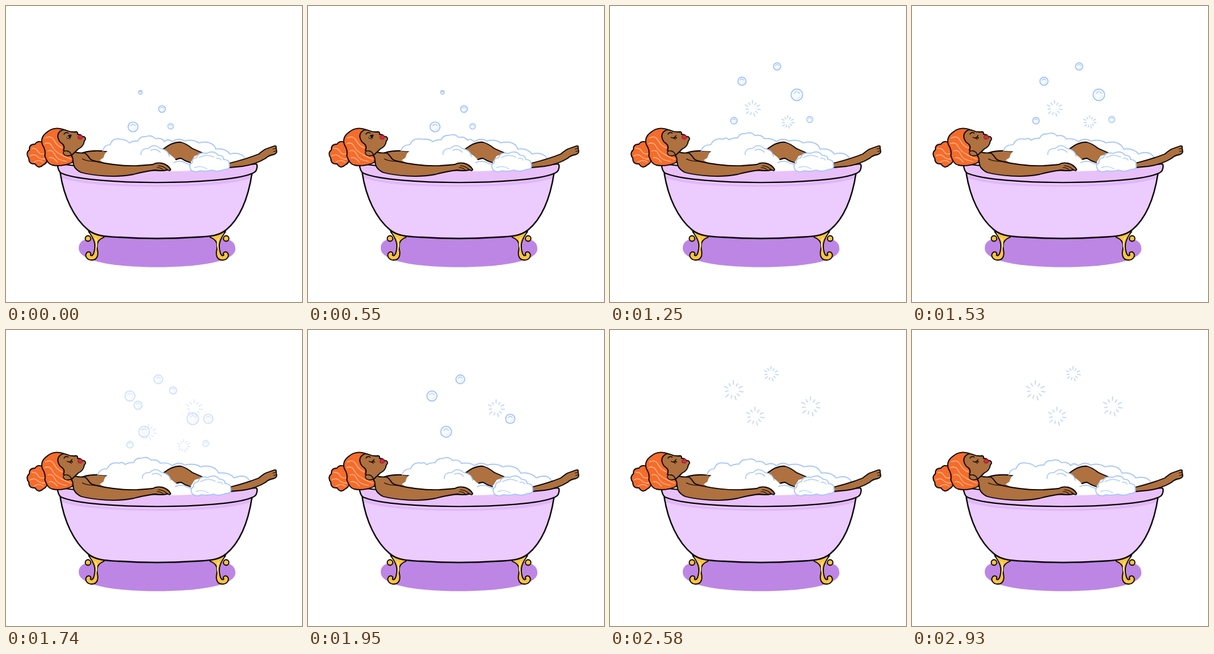
An HTML page for the animation above (3130 ms loop, 480 by 480 pixels).

```html
<!DOCTYPE html>
<html lang="en">
<head>
<meta charset="utf-8">
<title>Bubble bath</title>
<style>
html, body { margin: 0; width: 100%; height: 100%; overflow: hidden; background: #fff; }
svg { display: block; width: 100%; height: 100%; }
.ink { stroke: #0b0708; stroke-width: 1.8; }
.skin { fill: #ae713f; }
.line { fill: none; }
.foam { fill: #fff; stroke: #a5c5fa; stroke-width: 1.7; }
.shade { fill: none; stroke: #b5d0fb; stroke-width: 1.4; }
.white { fill: #fff; }
.lock { fill: none; stroke: #ffad80; stroke-width: 1.6; }
</style>
</head>
<body>
<svg viewBox="0 0 480 480" stroke-linecap="round" stroke-linejoin="round">
  <path fill="#bd86e5" d="M118 393C118 371 150 374 245 374S372 371 372 394C372 415 310 423.500 245 423.500S118 415 118 393Z"/>

  <g id="tub">
    <g id="leg" class="ink" fill="#fcc340">
      <circle cx="133" cy="377" r="4.500"/>
      <path d="M134 366C143 378 146 386 143 398C142 404 139 406 137 404C139 400 135 397 131 400C127 405 131 412 139 412C149 412 150 403 148 394C147 384 149 379 159 375L156 367Z"/>
      <path class="line" stroke="#fff0a8" style="stroke:#ffe795" d="M145 376Q149 383 146 394"/>
    </g>
    <use href="#leg" transform="matrix(-1 0 0 1 490 0)"/>
    <path id="bowl" fill="#eccbff" d="M88 271C94 310 110 344 133 363C146 374 165 374 185 375Q245 379 305 375C330 374 345 373 357 363C380 344 393 310 399 271Z"/>
    <path fill="#e0b7f8" d="M90 273C140 296 350 296 398 272L397 279C350 298 140 298 91 279Z"/>
    <path class="ink line" style="stroke-width:2.300" d="M88 271C94 310 110 344 133 363C146 374 165 374 185 375Q245 379 305 375C330 374 345 373 357 363C380 344 393 310 399 271"/>
    <path class="ink" style="stroke-width:2.200" fill="#e9c1fa" d="M86 256Q245 277 405 256Q409 257 406 266Q404 270 398 272C350 291 140 291 92 272Q86 271 84 261Q83 257 86 256Z"/>
  </g>

  <path class="ink skin" d="M124 238Q145 232 169 237L169 262L122 262Z"/>
  <path id="backFoam" class="foam"/>
  <path class="white" d="M158 246Q160 236 170 232H300L362 246V262Q300 268 262 268L175 260Q160 256 152 250Z"/>
  <path class="ink skin" d="M362 255Q390 248 410 240Q417 234 421 232L435 227Q439 226 438 230L439 236Q439 239 434 241Q426 242 421 247Q405 257 383 260L362 262"/>
  <path class="ink line" style="stroke-width:1" d="M433 232L437 231M434 236L438 235"/>
  <path class="skin" d="M253 234Q272 219 284 221Q292 223 302 231L320 239L306 243L299 254Q292 253 284 247L276 250Q268 240 253 234Z"/>
  <path class="ink line" d="M255 232Q272 219 284 221Q292 223 302 231L318 238M272 251Q278 247 284 247Q291 252 299 254"/>
  <g id="frontFoam">
    <path class="white" d="M218 242Q218 231 231 231Q240 222 250 231Q263 234 264 243L276 250L272 262H210Z"/>
    <path class="shade" style="stroke:#a5c5fa" d="M219 241Q218 231 231 231Q240 222 250 231Q263 233 265 244M235 234Q243 230 250 237M272 254Q283 249 292 255L299 257"/>
    <path class="foam" d="M300 266Q295 258 302 254Q301 247 309 246Q312 236 325 239Q337 233 344 242Q353 242 353 249Q363 249 362 258Q364 265 354 265Q344 270 334 266Q324 269 315 267Q306 271 300 266Z"/>
    <path class="shade" d="M313 246Q325 239 337 245M341 247Q347 246 349 250M306 262Q316 258 326 264"/>
  </g>

  <path class="ink skin" d="M104 232Q113 240 127 238C137 243 131 249 146 252Q180 260 213 259Q228 258 238 257Q244 253 253 255Q262 257 267 265Q267 268 262 266Q251 268 242 266Q221 269 207 273C178 279 141 275 122 270Q109 264 109 253Z"/>
  <path class="ink line" style="stroke-width:1.200" d="M124 248Q131 252 146 252M247 259Q255 259 262 266M245 262Q252 262 256 267"/>

  <g id="head">
    <path class="ink" fill="#f56c2b" d="M61 222Q52 217 47 224Q37 224 38 233Q31 239 37 247Q37 257 47 256Q53 265 60 258Q68 254 67 246Z"/>
    <path class="lock" d="M42 231Q49 230 52 236T64 239M39 243Q46 239 51 244T64 248M46 253Q53 248 60 253"/>
    <path class="ink skin" d="M84 203Q91 199 99 202Q106 205 113 204Q117 204 116 208L121 209L123 211L127 212Q131 215 127 219Q126 228 117 232Q111 238 104 244L84 234Z"/>
    <path class="ink" fill="#f56c2b" d="M93 200Q77 195 66 205Q55 213 59 225Q65 234 63 243Q67 256 75 258Q91 261 107 254Q111 247 105 242L93 234Q97 226 88 221Q80 210 88 203Z"/>
    <path class="lock" d="M64 214Q73 209 78 218T91 230M63 223Q71 220 75 228T91 242T105 248M68 235Q75 232 79 241T98 252M70 246Q76 244 83 253"/>
    <path class="ink skin" style="stroke-width:1.400" d="M105 242Q96 245 93 239Q92 234 99 235Q104 236 106 241"/>
    <path class="ink line" style="stroke-width:1.400" d="M94 208Q96 204 101 206"/>
    <path fill="#d82743" stroke="#70131d" stroke-width=".7" d="M121 209Q115 210 117 215Q122 218 125 213Z"/>
    <g id="eyeOpen">
      <path fill="#fff" class="ink" style="stroke-width:1" d="M99 214Q100 208 106 209L104 215Z"/>
      <path fill="#21120e" d="M101 209H106L104 214H101Z"/>
    </g>
    <path id="eyeShut" class="ink line" style="stroke-width:1.400" d="M99 213Q104 216 107 210M103 214L106 216M106 213L108 214"/>
  </g>
  <g id="bubbles"></g>
</svg>
<script>
const LOOP = 3130, STEP = 70, HOLD = 270, LAST = 2930, FADE = 210;
const byId = id => document.getElementById(id);
const clamp = v => Math.max(0, Math.min(1, v));

// Each stage: [start, bubbles as [x, y, radius], bursts as [x, y, radius]]
const stages = [
  [-FADE, [[218, 140, 3], [253, 167, 5.5], [267, 195, 4.6], [206, 196, 8]], []],
  [620, [[277, 113, 3.6], [219, 138, 4.4], [305, 157, 6.3], [231, 176, 8.5], [191, 198, 4], [286, 199, 7.8], [329, 177, 3.8]], []],
  [1040, [[271, 98, 5.8], [214, 122, 6.6], [303, 144, 9.4], [201, 186, 5.3], [324, 184, 5]], [[231, 166, 13], [288, 188, 10.5]]],
  [1635, [[247, 80, 7.1], [201, 107, 8.2], [328, 144, 7.5], [224, 165, 8.8]], [[305, 127, 14]]],
  [2300, [], [[200, 98, 16], [261, 71, 12], [325, 124, 16], [235, 140, 15]]]
];

function bubble([x, y, r]) {
  const a = r * .58;
  return `<g transform="translate(${x} ${y})" fill="none" stroke="#a0c3fa">
    <circle r="${r}" fill="#f7fbff" stroke-width="${r > 5 ? 1.7 : 1.3}"/>
    <path d="M${-a * .8} ${-a * .4}Q0 ${-a * 1.5} ${a * .8} ${-a * .4}" stroke-width="1.1"/>
    <path d="M${a} ${a * .2}Q${a * .8} ${a} ${a * .1} ${a}" stroke="#d4e5ff"/></g>`;
}

function burst([x, y, r]) {
  let d = "";
  for (let i = 0; i < 11; i++) {
    const a = i * Math.PI * 2 / 11 + .15, inner = r * (i % 2 ? .52 : .62), outer = r * (i % 2 ? .82 : 1);
    d += `M${x + inner * Math.cos(a)} ${y + inner * Math.sin(a)}L${x + outer * Math.cos(a)} ${y + outer * Math.sin(a)}`;
  }
  return `<path d="${d}" stroke="#bdd3fb" stroke-width="1.5"/>`;
}

byId("bubbles").innerHTML = stages.map(([, dots, pops]) =>
  `<g>${dots.map(bubble).join("")}${pops.map(burst).join("")}</g>`).join("");
const layers = [...byId("bubbles").children];

// Foam drift: [time, left, crest x, crest y, right]
const drift = [
  [0, 8, 4, 4, 0], [550, 2, 6, 2, 0], [970, 0, 0, 0, 0], [1250, -1, -3, -1, 1],
  [1740, 0, -3, 0, 9], [2230, 9, -5, 1, 9], [LAST, 8, 4, 4, 0]
];

function driftAt(t) {
  const i = Math.max(1, drift.findIndex(k => k[0] >= t));
  const a = drift[i - 1], b = drift[i], k = (t - a[0]) / (b[0] - a[0]);
  return a.map((v, j) => v + (b[j] - v) * k).slice(1);
}

function foamPath([l, x, y, r]) {
  return `M${149 + l} 235Q${151 + l} 225 ${164 + l * .6} 225Q${169 + l * .4} 213 ${184 + l * .3} 216
    Q${192 + x} ${213 + y} ${196 + x} ${218 + y}Q${203 + x} ${214 + y} ${210 + x} ${215 + y}
    Q${213 + x} ${207 + y} ${222 + x} ${208 + y}Q${232 + x} ${204 + y} ${238 + x} ${211 + y}
    Q${249 + x} ${209 + y} ${253 + x} ${216 + y}Q262 214 270 220Q280 213 290 219
    Q${303 + r * .3} 215 ${313 + r * .3} 222Q${328 + r * .3} 218 ${337 + r * .4} 226
    Q${340 + r * .5} 230 ${340 + r * .5} 232Q${356 + r * .6} 230 ${363 + r * .8} 240
    Q${380 + r} ${236 - r * .5} ${387 + r} 246`;
}

function draw(t) {
  const shown = stages.map(([start]) => clamp((t - start) / FADE));
  layers.forEach((g, i) => g.setAttribute("opacity", shown[i] * (1 - (shown[i + 1] || 0))));
  byId("eyeOpen").setAttribute("opacity", 1 - shown[1]);
  byId("eyeShut").setAttribute("opacity", shown[1]);
  const d = driftAt(t);
  byId("backFoam").setAttribute("d", foamPath(d));
  byId("frontFoam").setAttribute("transform", `translate(${d[3] * .25} 0)`);
}

function tick() {
  const t = performance.now() % LOOP;
  draw(t < HOLD ? 0 : Math.min(LAST, HOLD + STEP * Math.floor((t - HOLD) / STEP)));
  requestAnimationFrame(tick);
}
tick();
</script>
</body>
</html>
```
